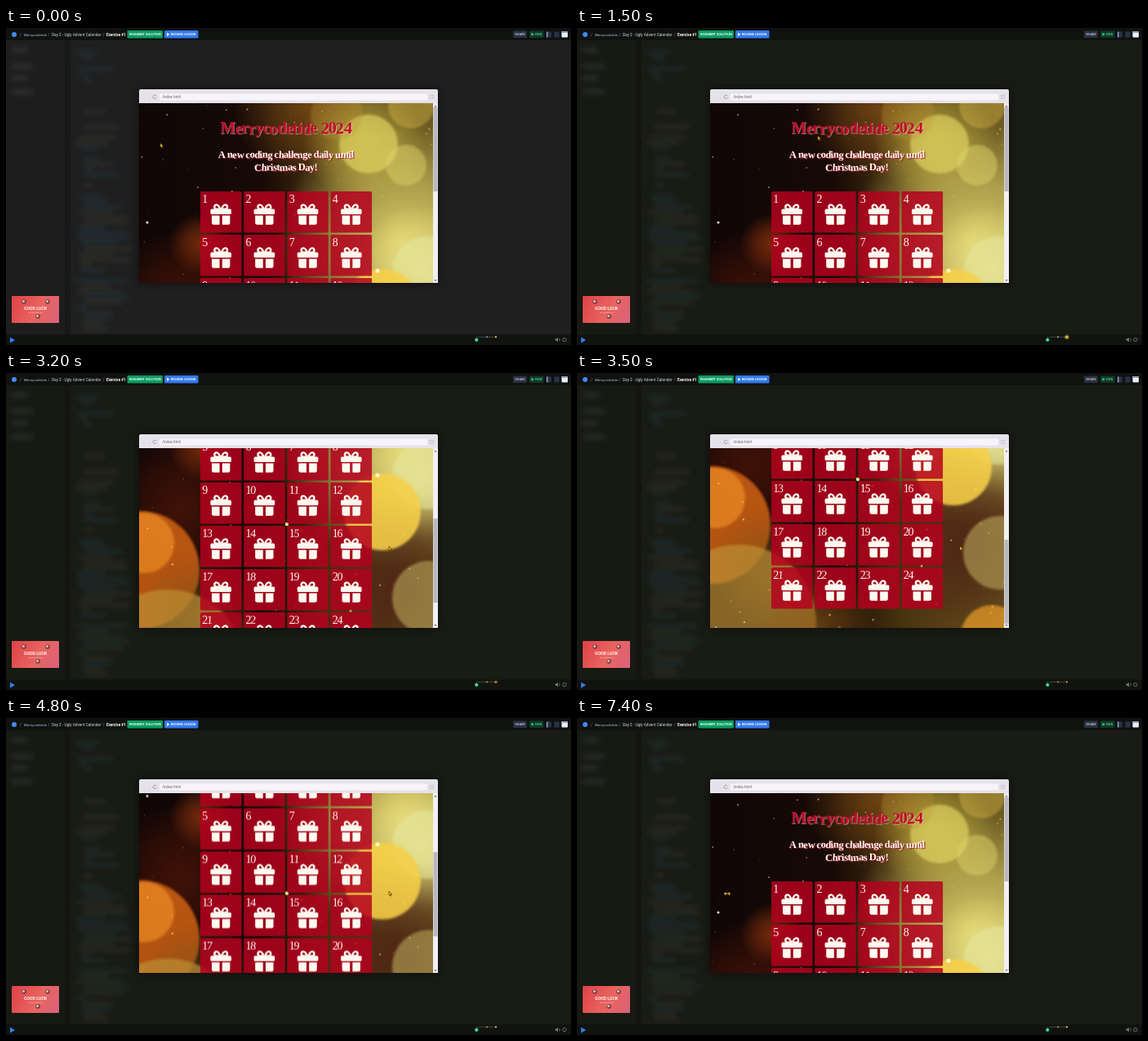
An HTML page with a canvas that plays this animation: 692 by 388 pixels, repeating every 8000 ms.

```html
<!DOCTYPE html>
<html lang="en">
<head>
<meta charset="utf-8">
<title>Advent calendar</title>
<style>
html, body { margin: 0; width: 692px; height: 388px; overflow: hidden; background: #191b17; }
canvas { display: block; }
</style>
</head>
<body>
<canvas id="stage" width="692" height="388"></canvas>
<script>
const W = 692, H = 388, LOOP = 8000, DOC_H = 447;
const VIEW = { x: 163, y: 92, w: 360, h: 220 };
const UI = 'Roboto, sans-serif', HAND = '"Liberation Serif", serif';
const ctx = document.getElementById('stage').getContext('2d');

// Key lists: time, then values
const SCROLL = [[2700, 0], [2800, 20], [3000, 98], [3200, 172], [3400, 219], [3500, 227],
  [4500, 227], [4700, 180], [5100, 30], [5300, 0]];
const POINTER = [[0, 189, 141], [900, 236, 146], [1500, 295, 132], [2100, 390, 175], [2600, 469, 212],
  [5400, 469, 212], [5800, 467, 210], [6100, 467, 210], [6400, 164, 215], [7000, 164, 215],
  [7200, 158, 213], [7400, 184, 215]];
const HOLDS = [[4400, 4600], [5800, 6200], [6400, 7100], [7400, LOOP]];

function track(keys, t) {
  if (t <= keys[0][0]) return keys[0].slice(1);
  const i = keys.findIndex(k => k[0] > t);
  if (i < 0) return keys[keys.length - 1].slice(1);
  const a = keys[i - 1], b = keys[i], f = (t - a[0]) / (b[0] - a[0]);
  return a.slice(1).map((v, n) => v + (b[n + 1] - v) * f);
}

function seeded(s) {
  return () => (s = (s * 16807) % 2147483647) / 2147483647;
}

function layer(w, h, paint) {
  const c = document.createElement('canvas');
  c.width = w;
  c.height = h;
  paint(c.getContext('2d'));
  return c;
}

function box(g, x, y, w, h, fill, r = 0) {
  g.fillStyle = fill;
  g.beginPath();
  g.roundRect(x, y, w, h, r);
  g.fill();
}

function disc(g, x, y, r, fill) {
  g.fillStyle = fill;
  g.beginPath();
  g.arc(x, y, r, 0, 7);
  g.fill();
}

function poly(g, points, fill) {
  g.fillStyle = fill;
  g.beginPath();
  points.forEach(p => g.lineTo(...p));
  g.closePath();
  g.fill();
}

function text(g, s, x, y, size, fill, weight = 400, align = 'left') {
  g.font = `${weight} ${size}px ${UI}`;
  g.textAlign = align;
  g.fillStyle = fill;
  g.fillText(s, x, y);
}

// Slightly wobbly hand lettering; cx is the centre, or the left edge when left is set
function lettering(g, s, cx, y, size, fill, gap, weight = 700, left = false) {
  g.font = `${weight} ${size}px ${HAND}`;
  g.textAlign = 'center';
  g.fillStyle = fill;
  const widths = [...s].map(c => g.measureText(c).width + gap);
  let x = left ? cx : cx - widths.reduce((a, b) => a + b) / 2;
  [...s].forEach((c, i) => {
    g.save();
    g.translate(x + widths[i] / 2, y + Math.sin(i * 2.4) * size * 0.03);
    g.rotate(Math.sin(i * 1.9) * 0.07);
    g.fillText(c, 0, 0);
    g.restore();
    x += widths[i];
  });
}

// Soft bokeh backdrop, in document coordinates
const backdrop = layer(VIEW.w, DOC_H, g => {
  const glow = (x, y, r, rgb, a) => {
    const f = g.createRadialGradient(x, y, 0, x, y, r);
    f.addColorStop(0, `rgba(${rgb},${a})`);
    f.addColorStop(0.5, `rgba(${rgb},${a * 0.6})`);
    f.addColorStop(1, `rgba(${rgb},0)`);
    g.fillStyle = f;
    g.fillRect(0, 0, VIEW.w, DOC_H);
  };
  const bokeh = (x, y, r, rgb, a) => {
    g.filter = 'blur(1.5px)';
    disc(g, x, y, r, `rgba(${rgb},${a})`);
    g.filter = 'none';
  };
  const base = g.createLinearGradient(0, 0, VIEW.w, 0);
  base.addColorStop(0, '#100606');
  base.addColorStop(0.42, '#170a06');
  base.addColorStop(0.66, '#49340f');
  base.addColorStop(1, '#6b5a21');
  g.fillStyle = base;
  g.fillRect(0, 0, VIEW.w, DOC_H);
  glow(205, 5, 90, '135,82,22', 0.65);
  glow(320, 170, 150, '224,211,108', 0.95);
  glow(275, 45, 75, '205,190,70', 0.7);
  glow(345, 205, 80, '240,232,140', 0.8);
  glow(75, 173, 38, '150,55,15', 0.75);
  glow(50, 245, 90, '95,25,8', 0.6);
  glow(320, 345, 120, '78,34,20', 0.95);
  bokeh(281, 50, 36, '226,216,100', 0.65);
  bokeh(242, 13, 32, '190,150,55', 0.3);
  bokeh(333, 3, 28, '225,190,75', 0.4);
  bokeh(327, 76, 25, '222,210,105', 0.5);
  bokeh(352, 205, 42, '228,232,160', 0.55);
  bokeh(298, 250, 47, '246,208,72', 0.88);
  bokeh(355, 355, 45, '172,152,80', 0.7);
  bokeh(345, 457, 38, '228,152,40', 0.75);
  bokeh(2, 321, 72, '208,98,20', 0.85);
  bokeh(6, 288, 37, '245,150,40', 0.6);
  glow(75, 375, 75, '125,80,25', 0.6);
  bokeh(35, 440, 95, '190,147,55', 0.68);
  glow(130, 445, 70, '150,95,25', 0.6);
  const rnd = seeded(77);
  for (let i = 0; i < 130; i++) {
    const y = rnd() * DOC_H, size = 0.3 + rnd() * (y > 250 ? 1.5 : 0.8);
    disc(g, rnd() * VIEW.w, y, size, `rgba(255,224,120,${0.2 + rnd() * 0.55})`);
  }
  disc(g, 292, 205, 2.6, '#fff6c0');
  disc(g, 181, 265, 2.2, '#ffe88a');
  disc(g, 10, 146, 1.5, '#f2e3c5');
});

function gift(g, x, y) {
  const white = '#fffaf0';
  g.strokeStyle = white;
  g.lineWidth = 2.4;
  for (const side of [1, -1]) {
    g.save();
    g.translate(x, y);
    g.scale(side, 1);
    g.beginPath();
    g.moveTo(-0.8, -6.2);
    g.lineTo(-5.2, -6.2);
    g.arc(-5.2, -8.9, 2.7, Math.PI / 2, Math.PI * 1.5);
    g.quadraticCurveTo(-3, -11.6, -0.6, -6.2);
    g.stroke();
    box(g, -11.2, 1.6, 9.6, 11.2, white, [0, 0, 0, 2.4]);
    g.restore();
  }
  box(g, x - 12.8, y - 6.4, 25.6, 6.4, white, 1.6);
}

const page = layer(VIEW.w, DOC_H, g => {
  g.drawImage(backdrop, 0, 0);
  const title = 'Merrycodetide 2024';
  lettering(g, title, 181, 38, 20, 'rgba(245,205,190,.55)', -0.6);
  lettering(g, title, 180, 37, 20, '#c1092c', -0.6);
  ['A new coding challenge daily until', 'Christmas Day!'].forEach((line, i) => {
    const y = 67 + i * 15.5;
    lettering(g, line, 181, y + 1, 12.5, '#a0142b', -0.5);
    lettering(g, line, 180, y, 12.5, '#fffaf2', -0.5);
  });
  for (let i = 0; i < 24; i++) {
    const x = 75 + (i % 4) * 53.2, y = 108 + Math.floor(i / 4) * 53;
    box(g, x, y, 50.5, 50.5, 'rgba(182,0,30,.84)', 1.5);
    lettering(g, String(i + 1), x + 3, y + 13.5, 14, '#fff6ee', -1.5, 400, true);
    gift(g, x + 25.2, y + 28);
  }
});

// Everything around the browser window
const shell = layer(W, H, g => {
  const rnd = seeded(12);
  box(g, 0, 15, 72, 360, 'rgba(0,0,0,.05)');
  box(g, 72, 15, 7, 360, 'rgba(0,0,0,.2)');
  g.filter = 'blur(3px)';
  [27, 47, 61, 78].forEach((y, i) => box(g, 7, y - 2, 19 + i % 2 * 7, 4, 'rgba(125,130,130,.26)'));
  for (let y = 22; y < 372; y += 6.5) {
    const dense = y > 205 && y < 285 || y > 305 && y < 338;
    if (!dense && rnd() < 0.35) continue;
    const x = 85 + rnd() * 12, w = (dense ? 28 : 10) + rnd() * 35;
    box(g, x, y, w, 3.5, rnd() < 0.5 ? 'rgba(50,100,115,.3)' : 'rgba(125,135,110,.2)');
  }
  g.filter = 'none';

  box(g, 0, 0, W, 15, '#10120f');
  disc(g, 10, 8, 3, '#4389f5');
  for (const x of [17, 51.5, 118.5]) text(g, '/', x, 9.7, 4.7, '#858b94');
  text(g, 'Merrycodetide', 22, 9.7, 4.4, '#a9c2e6');
  text(g, 'Day 2 - Ugly Advent Calendar', 56, 9.7, 4.75, '#cfd8e4');
  text(g, 'Exercise #1', 123, 9.7, 4.5, '#ffffff', 700);
  box(g, 148.5, 3, 43.5, 9.5, '#0b9c61', 1.2);
  text(g, 'RESUBMIT SOLUTION', 170.3, 9.4, 3.9, '#e8fff3', 700, 'center');
  box(g, 194, 3, 41.5, 9.5, '#3279ee', 1.2);
  poly(g, [[197, 5.7], [200.5, 7.8], [197, 9.9]], '#fff');
  text(g, 'RESUME LESSON', 217, 9.4, 3.9, '#f0f5ff', 700, 'center');
  box(g, 621, 3.5, 17, 8.5, '#29303f', 1);
  text(g, 'SHARE', 629.5, 9.4, 4, '#c2cbdc', 500, 'center');
  box(g, 641, 3.5, 17.5, 8.5, '#12382a', 1);
  poly(g, [[643.5, 5.8], [647, 7.8], [643.5, 9.8]], '#25d38b');
  text(g, 'RUN', 652.3, 9.4, 4, '#49d99b', 500, 'center');
  box(g, 662, 4.5, 6, 7, '#26334a', 0.5);
  box(g, 662, 4.5, 1.5, 7, '#8fa5ca');
  box(g, 671.5, 4.5, 6, 7, '#26334a', 0.5);
  box(g, 680.5, 4, 7.5, 7.5, '#e9edf5', 0.8);
  box(g, 680.5, 4, 7.5, 2, '#90a5c6');

  box(g, 0, 375, W, 13, '#11130f');
  poly(g, [[5, 378.5], [11, 382], [5, 385.5]], '#347ff2');
  g.strokeStyle = '#777d82';
  g.lineWidth = 0.8;
  g.beginPath();
  g.arc(684, 381.5, 2.2, 0, 7);
  g.stroke();
  poly(g, [[672.5, 380.5], [674, 380.5], [676, 378.8], [676, 384.2], [674, 382.5], [672.5, 382.5]], '#777d82');
  g.beginPath();
  g.arc(676, 381.5, 2.2, -1, 1);
  g.stroke();

  const card = g.createLinearGradient(7, 328, 65, 361);
  card.addColorStop(0, '#de4148');
  card.addColorStop(0.55, '#e9645f');
  card.addColorStop(1, '#d8627c');
  box(g, 7, 328, 58, 33, card, 1);
  for (const [x, y] of [[22, 335], [51, 335], [39, 353]]) {
    disc(g, x, y, 2.8, '#793c42');
    disc(g, x - 0.5, y - 0.5, 1.5, '#dcc4bb');
  }
  text(g, 'GOOD LUCK', 36, 345.3, 5.2, '#fff5ee', 700, 'center');
  text(g, 'with the next task', 36, 348.5, 2.2, '#ffe5df', 400, 'center');

  g.shadowColor = 'rgba(0,0,0,.55)';
  g.shadowBlur = 12;
  box(g, 163, 75, 366, 237, '#e6e2e9', 2);
  g.shadowBlur = 0;
  box(g, 188, 80.5, 328, 8, '#f8f5fa', 1.5);
  text(g, '/index.html', 191, 86.4, 4.6, '#67646d');
  text(g, '‹', 168, 86.5, 6, '#c3bfc8');
  text(g, '›', 174.5, 86.5, 6, '#c3bfc8');
  g.strokeStyle = '#8f8c97';
  g.beginPath();
  g.arc(182.3, 84.3, 2.2, 0.4, 5.8);
  g.stroke();
  g.strokeStyle = '#c0bcc6';
  g.strokeRect(519.7, 82.5, 3.6, 3.6);
  box(g, 523, 92, 6, 220, '#f1eff2');
  poly(g, [[524.5, 96.5], [526, 94.5], [527.5, 96.5]], '#66636a');
  poly(g, [[524.5, 308], [526, 310], [527.5, 308]], '#66636a');
});

function lights(t) {
  const glow = Math.max(0, Math.sin(t / 1300 * 2 * Math.PI));
  const warm = t > 2900 && t < 4500 ? '#ee8c2c' : '#edc52e';
  box(ctx, 578, 377.8, 22, 0.7, '#4c6258');
  box(ctx, 576, 377.8, 0.8, 3, '#4c6258');
  disc(ctx, 576.3, 381.8, 2.2, '#23bd83');
  box(ctx, 575.3, 381.3, 2, 0.8, '#dcffef');
  disc(ctx, 589, 378.2, 1.1, t < 2900 ? '#718ba0' : '#b56f4b');
  ctx.globalAlpha = 0.45 * glow;
  disc(ctx, 600, 378.2, 3, warm);
  ctx.globalAlpha = 1;
  disc(ctx, 600, 378.2, 1.1 + 0.5 * glow, warm);
}

function pointer(x, y, resizing) {
  const gold = '#f5d229';
  if (resizing) {
    box(ctx, x - 2.5, y - 0.5, 5, 1, gold);
    for (const s of [-1, 1]) poly(ctx, [[x + s * 4, y], [x + s * 1.8, y - 2], [x + s * 1.8, y + 2]], gold);
    return;
  }
  ctx.strokeStyle = '#463506';
  ctx.lineWidth = 0.7;
  poly(ctx, [[0, 0], [0, 5], [1.2, 4], [2, 6], [3, 5.5], [2.2, 3.6], [3.7, 3.5]]
    .map(([a, b]) => [x + a, y + b]), gold);
  ctx.stroke();
}

function draw(t) {
  const [scroll] = track(SCROLL, t), [x, y] = track(POINTER, t);
  const f = Math.min(1, t / 500), mix = (a, b) => Math.round(a + (b - a) * f);
  ctx.fillStyle = `rgb(${mix(31, 25)},${mix(31, 27)},${mix(31, 21)})`;
  ctx.fillRect(0, 0, W, H);
  ctx.drawImage(shell, 0, 0);
  ctx.drawImage(page, 0, scroll, VIEW.w, VIEW.h, VIEW.x, VIEW.y, VIEW.w, VIEW.h);
  box(ctx, 523.5, 97 + scroll * 0.472, 5, 103, '#b9b6bd');
  lights(t);
  pointer(x, y, t >= 6400);
}

const start = performance.now();
function tick(now) {
  const t = Math.floor(Math.max(0, now - start) % LOOP / 100) * 100;
  const hold = HOLDS.find(([a, b]) => t >= a && t < b);
  draw(hold ? hold[0] : t);
  requestAnimationFrame(tick);
}
requestAnimationFrame(tick);
</script>
</body>
</html>
```
